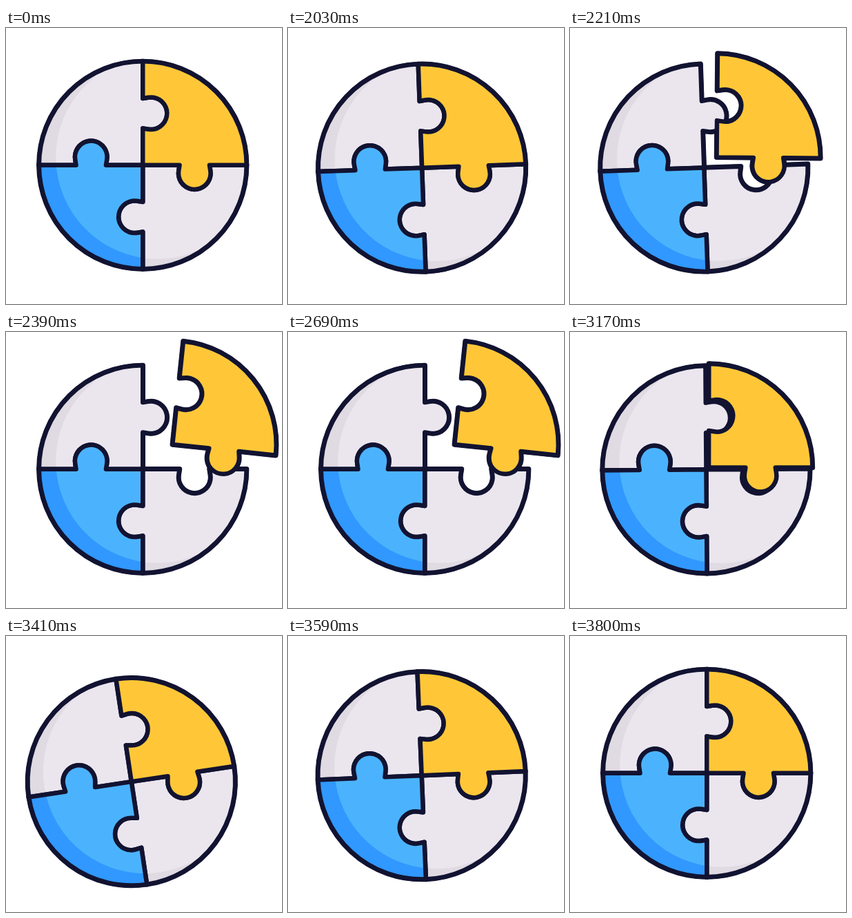
These frames come from a looping animation (400 by 400 pixels, 3.83 s). An HTML page with a canvas:

```html
<!DOCTYPE html>
<html lang="en">
<head>
<meta charset="utf-8">
<title>Puzzle circle</title>
<style>
  html, body { margin: 0; width: 100%; height: 100%; overflow: hidden; background: #fff; }
  canvas { display: block; width: 400px; height: 400px; }
</style>
</head>
<body>
<canvas id="stage" width="400" height="400"></canvas>
<script>
const ctx = document.getElementById('stage').getContext('2d');
const LOOP = 3830, HOLD = 2000, STEP = 30;
const MID_X = 198.25, MID_Y = 198.75, R = 150.4;
const LINE = 6.5, RIM = 7.4;
const INK = '#121331';
const rad = d => d * Math.PI / 180;

// One quarter: a notch in its upright edge, a knob on its level edge.
function quarter() {
  const at = 75, neck = 21.7, out = 11.8, r = 23.3;
  const dx = r * Math.sin(rad(10)), dy = r * Math.cos(rad(10));
  const p = new Path2D();
  p.moveTo(0, 0);
  p.lineTo(0, neck - at);
  p.lineTo(out - dx, dy - at);
  p.arc(out, -at, r, rad(100), rad(-100), true);
  p.lineTo(0, -at - neck);
  p.lineTo(0, -R);
  p.arc(0, 0, R, rad(-90), 0);
  p.lineTo(at + neck, 0);
  p.lineTo(at + dy, out - dx);
  p.arc(at, out, r, rad(-10), rad(190));
  p.lineTo(at - neck, 0);
  p.closePath();
  return p;
}

const shape = quarter();

function piece(turn, light, shade) {
  const path = new Path2D();
  path.addPath(shape, new DOMMatrix().rotate(turn * 90));
  return { path, light, shade };
}

const yellow = piece(0, '#ffc738', '#ffc738');
const others = [
  piece(1, '#ebe6ee', '#e0dae2'),
  piece(3, '#ebe6ee', '#e0dae2'),
  piece(2, '#4bb3fd', '#3098fe')
];

function outline(path, width) {
  ctx.strokeStyle = INK;
  ctx.lineWidth = width;
  ctx.lineJoin = 'round';
  ctx.stroke(path);
}

// Slightly wider outline that lies under every piece and firms up the outer edge.
const drawRim = p => outline(p.path, RIM);

function drawPiece({ path, light, shade }) {
  ctx.save();
  ctx.clip(path);
  ctx.fillStyle = shade;
  ctx.fillRect(-200, -200, 400, 400);
  ctx.fillStyle = light;
  ctx.beginPath();
  ctx.arc(21.5, -11.5, 147.5, 0, Math.PI * 2);
  ctx.fill();
  ctx.restore();
  outline(path, LINE);
}

function withPose([x, y, turn], draw) {
  ctx.save();
  ctx.translate(MID_X + x, MID_Y + y);
  ctx.rotate(rad(turn));
  draw();
  ctx.restore();
}

const part = (t, a, b) => Math.min(1, Math.max(0, (t - a) / (b - a)));
const ease = (t, a, b) => (1 - Math.cos(Math.PI * part(t, a, b))) / 2;

// Recoil before the yellow quarter leaves, and the knock when it lands.
function bodyPose(t) {
  const recoil = Math.sin(part(t, 2000, 2115) * Math.PI / 2) - ease(t, 2115, 2280);
  const knock = ease(t, 3135, 3385) - ease(t, 3385, 3700);
  return [
    -10.3 * recoil - 16.7 * knock,
    9.8 * recoil + 12.6 * knock,
    -5.2 * recoil - 8.7 * knock
  ];
}

function yellowPose(t, [x, y, turn]) {
  const away = ease(t, 2056, 2398) - ease(t, 2892, 3234);
  return [x + 43.1 * away, y - 35.8 * away, turn + 6 * away];
}

function render(time) {
  const now = time % LOOP;
  const t = now < HOLD ? 0 : HOLD + Math.floor((now - HOLD) / STEP) * STEP;
  ctx.fillStyle = '#fff';
  ctx.fillRect(0, 0, 400, 400);
  const body = bodyPose(t), free = yellowPose(t, body);
  withPose(free, () => drawRim(yellow));
  withPose(body, () => {
    others.forEach(drawRim);
    others.forEach(drawPiece);
  });
  withPose(free, () => drawPiece(yellow));
}

const start = performance.now();
function tick() {
  render(performance.now() - start);
  requestAnimationFrame(tick);
}
tick();
</script>
</body>
</html>
```
